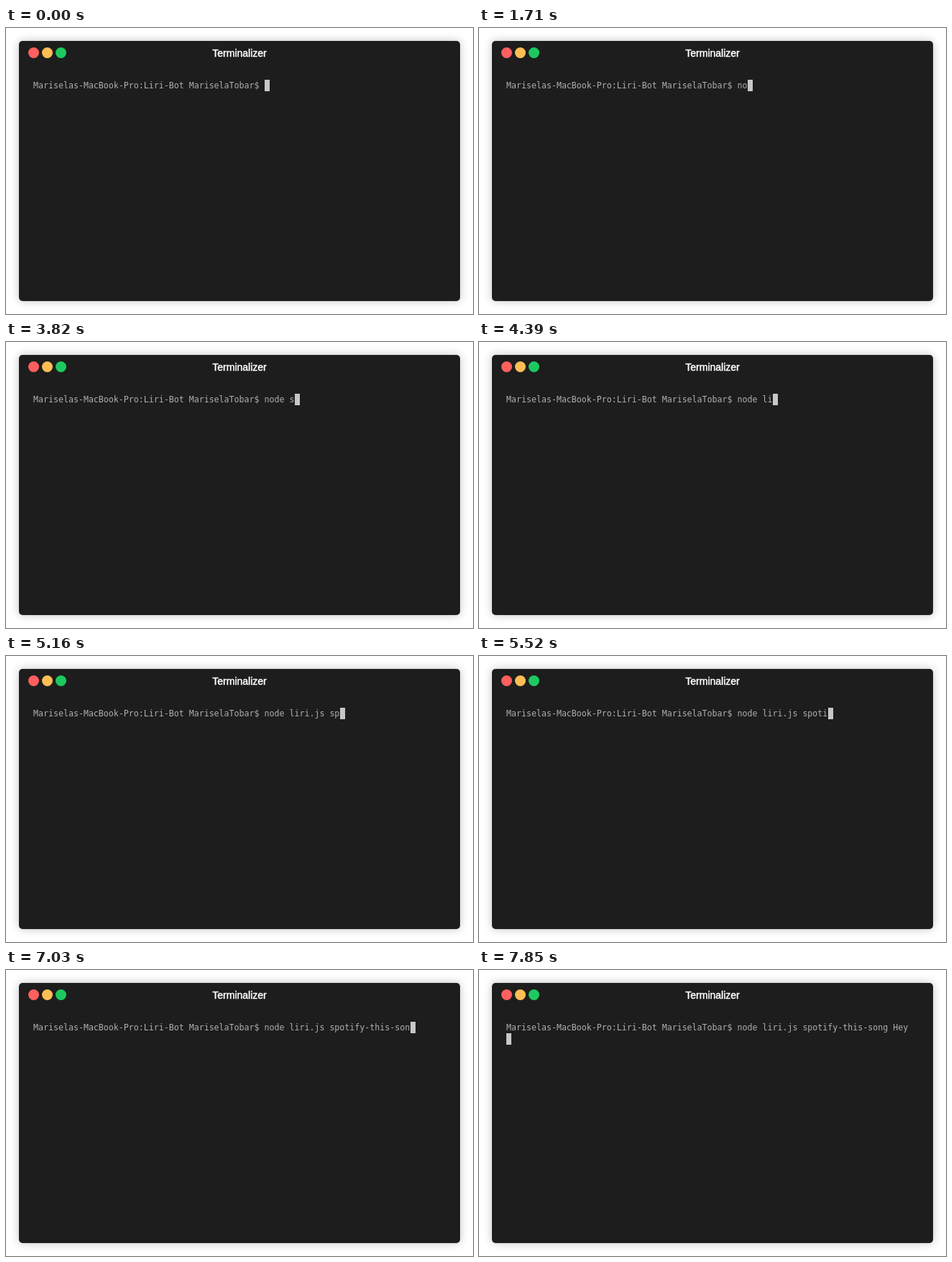
An HTML page for the animation above (8 s loop, 650 by 398 pixels).

```html
<!DOCTYPE html>
<html lang="en">
<head>
<meta charset="utf-8">
<title>Terminal</title>
<style>
  html, body { margin: 0; width: 100%; height: 100%; overflow: hidden; background: #fff; }
  .window {
    position: absolute; left: 18px; top: 18px; width: 614px; height: 362px;
    border-radius: 5px; background: #1d1d1d;
    box-shadow: 0 0 12px rgba(0, 0, 0, .25);
  }
  .dot { position: absolute; top: 9px; width: 15px; height: 15px; border-radius: 50%; }
  .title {
    position: absolute; left: 0; top: 9px; width: 100%; text-align: center;
    font: 14px/16px "Liberation Sans", Arial, sans-serif;
    color: #fff; -webkit-text-stroke: .45px #fff;
  }
  .line {
    position: absolute; left: 20px; top: 54px; white-space: pre;
    font: 11.627px/16px "DejaVu Sans Mono", monospace;
    font-variant-ligatures: none; color: #afafaf;
  }
  .cursor { position: absolute; left: 20px; top: 54px; width: 7px; height: 16px; background: #c7c7c7; }
</style>
</head>
<body>
<div class="window">
  <div class="dot" style="left:13px;background:#ff5f5f"></div>
  <div class="dot" style="left:32px;background:#ffbd55"></div>
  <div class="dot" style="left:51px;background:#1dc95f"></div>
  <div class="title">Terminalizer</div>
  <div class="cursor" id="cursor"></div>
  <div class="line" id="line"></div>
</div>
<script>
  const LOOP = 8000, CELL = 7, ROW = 16;
  const PROMPT = "Mariselas-MacBook-Pro:Liri-Bot MariselaTobar$ ";
  const BACK = "\b", ENTER = "\n";

  // [time in ms, key]; a longer key is a tab completion
  const KEYS = [
    [410, "n"], [1710, "o"], [1760, "d"], [1820, "e"], [1880, " "], [1950, "s"],
    [3140, "p"], [3200, "o"], [3270, "t"], [3330, BACK],
    [3720, BACK], [3820, BACK], [3960, BACK], [4060, "l"],
    [4290, "i"], [4400, "ri.js "], [4510, "s"],
    [5160, "p"], [5230, "o"], [5330, "t"], [5440, "i"], [5540, "f"], [5640, "y"], [5740, "-"],
    [5950, "t"], [6070, "h"], [6140, "i"], [6220, "s"], [6290, "-"],
    [6660, "s"], [6960, "o"], [7030, "n"], [7150, "g"], [7210, " "], [7280, "H"],
    [7720, "e"], [7780, "y"], [7850, ENTER]
  ];

  const line = document.getElementById("line");
  const cursor = document.getElementById("cursor");

  function typedAt(time) {
    let text = "";
    for (const [at, key] of KEYS) {
      if (at > time) break;
      text = key === BACK ? text.slice(0, -1) : text + key;
    }
    return text;
  }

  function draw() {
    const text = PROMPT + typedAt(performance.now() % LOOP);
    const rows = text.split("\n");
    if (line.textContent !== text) line.textContent = text;
    const x = rows[rows.length - 1].length * CELL;
    const y = (rows.length - 1) * ROW;
    cursor.style.transform = `translate(${x}px, ${y}px)`;
    requestAnimationFrame(draw);
  }
  draw();
</script>
</body>
</html>
```
